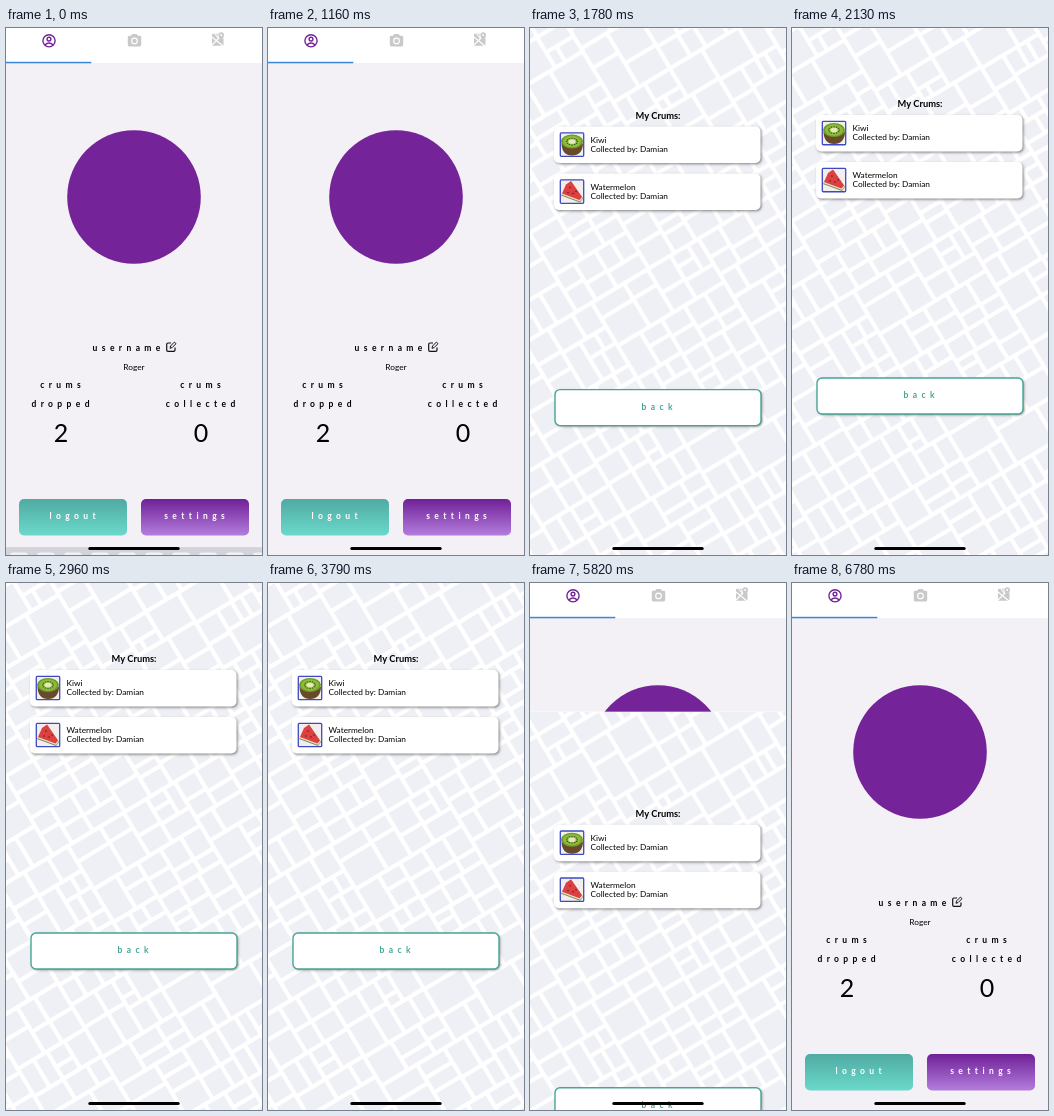
These frames come from a looping animation (256x527 px, 6810 ms). An HTML page with a canvas:

```html
<!DOCTYPE html>
<html lang="en">
<head>
<meta charset="utf-8">
<title>My Crums</title>
<style>
html, body { margin: 0; width: 100%; height: 100%; overflow: hidden; background: #f3f1f6; }
canvas { display: block; width: 256px; height: 527px; }
</style>
</head>
<body>
<canvas id="stage"></canvas>
<script>
const W = 256, H = 527, LOOP = 6810;
const TOP = -26;                 // the sheet reaches above the visible area
const OPEN = 1441, CLOSE = 5759.7, MAP_READY = 1730, RATE = 0.017;
const FONT = 'Lato, "Open Sans", sans-serif';
const PURPLE = '#742399', GREEN = '#46a594', GREY = '#c9c9c9';

const canvas = document.getElementById('stage');
const dpr = window.devicePixelRatio || 1;
canvas.width = W * dpr;
canvas.height = H * dpr;
const ctx = canvas.getContext('2d');

function box(x, y, w, h, r, fill, stroke, line = 1) {
  ctx.beginPath();
  ctx.roundRect(x, y, w, h, r);
  if (fill) { ctx.fillStyle = fill; ctx.fill(); }
  if (stroke) { ctx.strokeStyle = stroke; ctx.lineWidth = line; ctx.stroke(); }
}

function disc(x, y, r, fill) {
  ctx.beginPath();
  ctx.arc(x, y, r, 0, Math.PI * 2);
  ctx.fillStyle = fill;
  ctx.fill();
}

function path(d, fill, stroke, line = 1) {
  const p = new Path2D(d);
  if (fill) { ctx.fillStyle = fill; ctx.fill(p); }
  if (stroke) { ctx.strokeStyle = stroke; ctx.lineWidth = line; ctx.stroke(p); }
}

function text(str, x, y, size = 8.3, { weight = 400, color = '#000', align = 'center', gap = 0 } = {}) {
  ctx.font = `${weight} ${size}px ${FONT}`;
  ctx.letterSpacing = gap + 'px';
  ctx.textAlign = align;
  ctx.fillStyle = color;
  ctx.fillText(str, x + gap / 2, y);
  ctx.letterSpacing = '0px';
}

const spaced = (str, x, y, color = '#000') =>
  text(str, x, y, 8.5, { weight: 700, color, gap: 4.4 });

function shadowed(draw) {
  ctx.save();
  ctx.shadowColor = 'rgba(0,0,0,.42)';
  ctx.shadowBlur = 2.5 * dpr;
  ctx.shadowOffsetX = ctx.shadowOffsetY = 1.2 * dpr;
  draw();
  ctx.restore();
}

function button(x, label, from, to) {
  const g = ctx.createLinearGradient(0, 471, 0, 507);
  g.addColorStop(0, from);
  g.addColorStop(1, to);
  box(x, 471, 108, 36.5, 5, g);
  spaced(label, x + 53.5, 491, '#fff');
}

// Street map: a turned square split again and again into blocks
const map = (() => {
  const c = document.createElement('canvas');
  const h = H - TOP;
  c.width = W * dpr;
  c.height = h * dpr;
  const m = c.getContext('2d');
  let seed = 41;
  const rand = () => (seed = (seed * 16807) % 2147483647) / 2147483647;
  const road = 4.2;

  function split(x, y, w, d) {
    const wide = w > d;
    const long = wide ? w : d;
    if (long < 24 + rand() * 26) {
      m.fillRect(x, y, w - road, d - road);
      return;
    }
    const a = long * (0.35 + rand() * 0.3);
    if (wide) {
      split(x, y, a, d);
      split(x + a, y, w - a, d);
    } else {
      split(x, y, w, a);
      split(x, y + a, w, d - a);
    }
  }

  m.scale(dpr, dpr);
  m.fillStyle = '#fff';
  m.fillRect(0, 0, W, h);
  m.translate(W / 2, h / 2);
  m.rotate(-0.54);
  m.fillStyle = '#eff0f5';
  split(-330, -330, 660, 660);
  return c;
})();

function tabs() {
  ctx.fillStyle = '#fff';
  ctx.fillRect(0, 0, W, 35);
  ctx.fillStyle = '#3b86d8';
  ctx.fillRect(0, 33.8, 85.3, 1.5);

  ctx.strokeStyle = PURPLE;
  ctx.lineWidth = 1.4;
  ctx.beginPath();
  ctx.arc(43, 12.8, 6.1, 0, Math.PI * 2);
  ctx.stroke();
  ctx.beginPath();
  ctx.arc(43, 11.1, 1.9, 0, Math.PI * 2);
  ctx.stroke();
  path('M38.8 17Q43 13.2 47.2 17', null, PURPLE, 1.4);

  box(121.8, 7.8, 13.4, 10.6, 1.4, GREY);
  path('M125 8.1L126.3 6.1H130.7L132 8.1Z', GREY);
  disc(128.5, 12.9, 3.4, '#fff');
  disc(128.5, 12.9, 2.2, GREY);

  box(206, 5.8, 11.5, 12, 1, GREY);
  path('M206 9L217 18M206 17L213 10M209 6L212 10', null, '#fff', 1.1);
  disc(215.2, 7.3, 3.7, '#fff');
  path('M215.2 12.8Q212.3 9.3 212.3 7.1A2.9 2.9 0 0 1 218.1 7.1Q218.1 9.3 215.2 12.8Z', GREY);
  disc(215.2, 7.1, 1, '#fff');
}

function profile() {
  ctx.fillStyle = '#f3f1f6';
  ctx.fillRect(0, 0, W, H);
  tabs();
  disc(128, 169, 66.8, PURPLE);

  spaced('username', 120.5, 322.7);
  path('M165 315H162Q160.7 315 160.7 316.3V322Q160.7 323.3 162 323.3H167.7Q169 323.3 169 322V319.5', null, '#111', 1.2);
  path('M164 320.3L164.5 318L168.4 314.1L170 315.7L166.1 319.6Z', null, '#111');
  text('Roger', 128, 341.5);

  spaced('crums', 54.5, 359.7);
  spaced('dropped', 54.5, 378.5);
  spaced('crums', 194.5, 359.7);
  spaced('collected', 194.5, 378.5);
  text('2', 55, 414.2, 25);
  text('0', 195, 414.2, 25);

  button(13, 'logout', '#50aaa2', '#6ad8ca');
  button(135, 'settings', '#702097', '#b27cdc');
}

function kiwi() {
  box(30, 93, 24, 24, 1, '#f1f2ea');
  path('M31.5 104Q32 116 42 116Q52.5 116 53 104Z', '#68492a');
  ctx.save();
  ctx.translate(42, 102);
  ctx.scale(1, 0.64);
  disc(0, 0, 11, '#6f9c2c');
  disc(0, 0, 9, '#8dbb3b');
  for (let i = 0; i < 12; i++) {
    const a = i * Math.PI / 6;
    disc(5.3 * Math.cos(a), 5.3 * Math.sin(a), 0.8, '#37451c');
  }
  disc(0, 0, 3.6, '#e4eab9');
  ctx.restore();
}

function melon() {
  box(30, 93, 24, 24, 1, '#f3eeee');
  path('M31 109L50 116L53 112L41 95Z', '#6f9150');
  path('M31 108L50 115L52.5 112L41 94.5Z', '#f0d9cc');
  path('M32 107L49.5 113.5L52 110.5L41 94.5L36 98Z', '#dc4040');
  for (const [x, y] of [[40, 101], [38, 106], [43, 107], [46, 105]]) disc(x, y, 0.75, '#4b2020');
}

function card(dy, name, picture) {
  ctx.save();
  ctx.translate(0, dy);
  shadowed(() => box(24, 87, 206.5, 36.5, 5, '#fff'));
  picture();
  box(30.3, 93.3, 23.4, 23.4, 1, null, '#3f49c2', 1.3);
  text(name, 60.5, 103.3, 8.3, { align: 'left' });
  text('Collected by: Damian', 60.5, 112, 8.3, { align: 'left' });
  ctx.restore();
}

function sheet(y, ready) {
  ctx.save();
  ctx.translate(0, y);
  ctx.fillStyle = '#fff';
  ctx.fillRect(0, TOP, W, H - TOP);
  if (ready) ctx.drawImage(map, 0, TOP, W, H - TOP);
  text('My Crums:', 128, 79.2, 9.3, { weight: 700 });
  card(0, 'Kiwi', kiwi);
  card(47, 'Watermelon', melon);
  shadowed(() => box(25, 350, 206, 36, 5, '#fff'));
  box(25, 350, 206, 36, 5, null, GREEN, 1.4);
  spaced('back', 127, 370, GREEN);
  ctx.restore();
}

// Last sliver of a sheet that is leaving as the loop begins
function sliver(y) {
  ctx.fillStyle = '#d3d3db';
  ctx.fillRect(0, y, W, H - y);
  for (let x = 4; x < W; x += 27) box(x, y + 5.5, 18, 8, 3, '#f1f1f5');
}

// Share of the way still to go, critically damped
const rest = ms => ms <= 0 ? 1 : (1 + RATE * ms) * Math.exp(-RATE * ms);

function draw(t) {
  ctx.setTransform(dpr, 0, 0, dpr, 0, 0);
  profile();
  if (t < 220) sliver(H - 8 * Math.exp(-t / 65));

  const left = t < CLOSE ? rest(t - OPEN) : 1 - rest(t - CLOSE);
  if (left < 0.999) sheet((H - TOP) * left, t > MAP_READY);

  box(82.3, 519, 91.4, 3.1, 1.5, '#000');
}

const start = performance.now();
function tick() {
  draw((performance.now() - start) % LOOP);
  requestAnimationFrame(tick);
}
tick();
</script>
</body>
</html>
```
